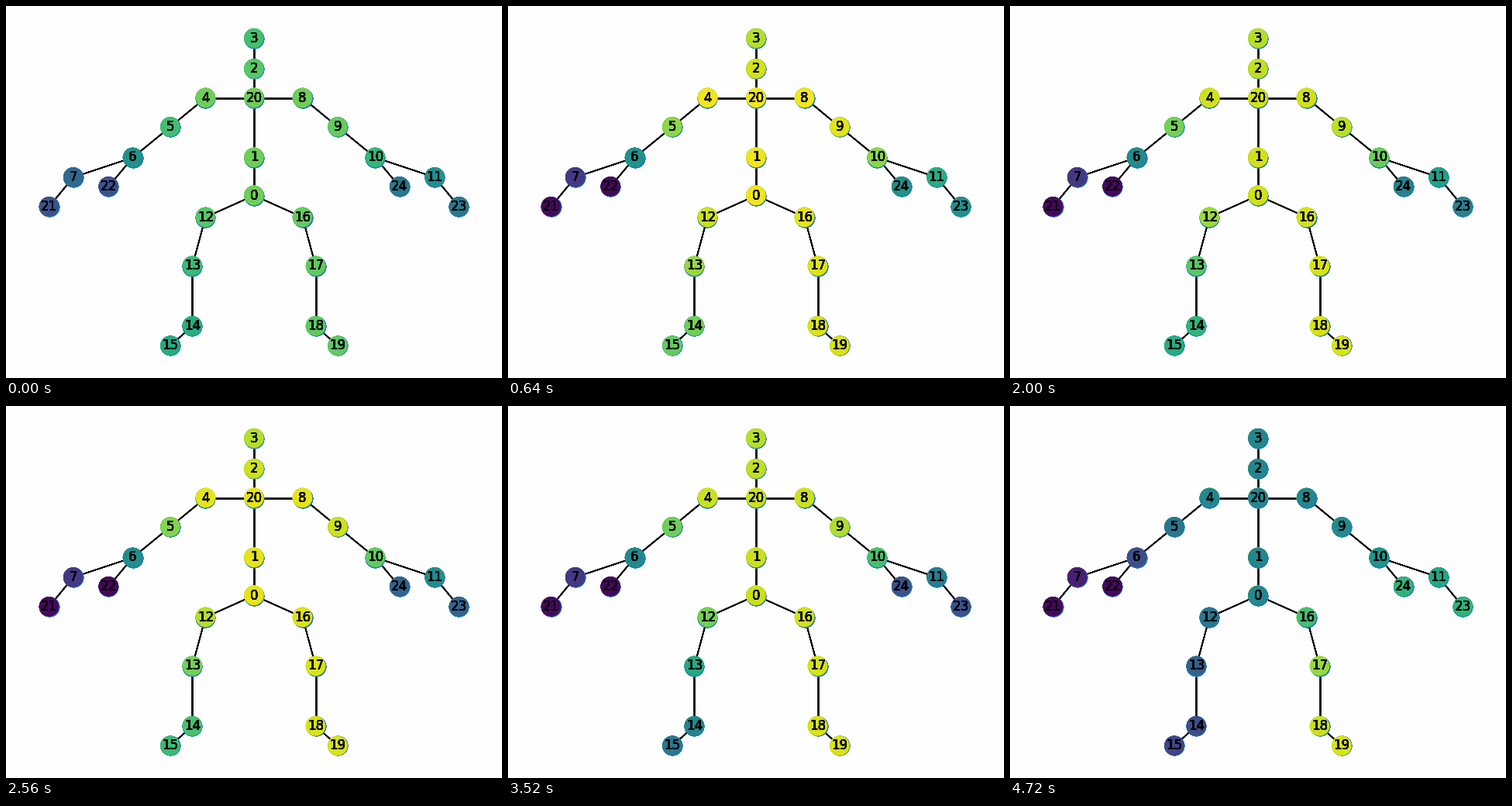
These frames come from a looping animation (640x480 px, 4.8 s). A matplotlib script:

```python
import numpy as np
import matplotlib.pyplot as plt
from matplotlib.animation import FuncAnimation
from matplotlib.collections import LineCollection

W, H, DPI = 640, 480, 100
FRAMES, STEP_MS = 60, 80
COATS = 10  # the graph is painted over itself, which hardens its edges

# Key joints in pixels: the spine, then pairs mirrored about the centre line.
SPINE = {0: 244.5, 1: 195.5, 20: 118.5, 2: 81, 3: 41.65}
PAIRS = [
    (4, 8, 62.56, 118.5), (5, 9, 108.06, 156), (6, 10, 156.4, 195.5),
    (7, 11, 233.2, 221), (21, 23, 264.46, 259), (22, 24, 187.7, 233),
    (12, 16, 62.56, 272.5), (13, 17, 79.6, 335.5), (14, 18, 79.6, 413),
    (15, 19, 108.06, 438.35),
]
TRUNK = [3, 2, 20, 1, 0]
LEFT_ARM, RIGHT_ARM = [4, 5, 6, 7, 21], [8, 9, 10, 11, 23]
LEFT_LEG, RIGHT_LEG = [0, 12, 13, 14, 15], [0, 16, 17, 18, 19]
CHAINS = [TRUNK, [20] + LEFT_ARM, [20] + RIGHT_ARM, LEFT_LEG, RIGHT_LEG,
          [6, 22], [10, 24]]

# Key levels of the parts that vary most.
KEY_MS = [0, 640, 1280, 2560, 3520, 4240, 4720]
CORE = [0.78, 0.98, 0.89, 0.96, 0.92, 0.93, 0.46]
RIGHT_HAND = [0.40, 0.50, 0.60, 0.32, 0.25, 0.23, 0.65]
LEFT_FOOT = [0.61, 0.76, 0.54, 0.68, 0.40, 0.64, 0.20]


def joint_positions():
    pos = np.zeros((25, 2))
    for joint, y in SPINE.items():
        pos[joint] = W / 2, H - y
    for left, right, dx, y in PAIRS:
        pos[left] = W / 2 - dx, H - y
        pos[right] = W / 2 + dx, H - y
    return pos


def smoothstep(u):
    return u * u * (3 - 2 * u)


def activity(frame):
    """Return the level of each joint, blended from the core to the tips."""
    t = frame * STEP_MS
    core, right_hand, left_foot = (
        np.interp(t, KEY_MS, keys) for keys in (CORE, RIGHT_HAND, LEFT_FOOT))
    opening = max(0, 1 - t / KEY_MS[1])
    left_hand = 0.02 + 0.23 * opening
    right_foot = 0.94 - 0.19 * opening
    head = min(core, 0.89) - 0.08 * opening

    levels = np.full(25, core)
    # A bend above 1 keeps the change near the tip of the chain.
    for chain, tip, bend in [
        ([20, 2, 3], head, 1), (LEFT_ARM, left_hand, 1),
        (RIGHT_ARM, right_hand, 1.4), (LEFT_LEG, left_foot, 0.8),
        (RIGHT_LEG, right_foot, 0.5),
    ]:
        u = np.linspace(0, 1, len(chain)) ** bend
        levels[chain] = core + (tip - core) * smoothstep(u)
    levels[22], levels[24] = left_hand, right_hand
    return levels


pos = joint_positions()
x, y = pos.T
levels = [activity(frame) for frame in range(FRAMES)]
bones = [(pos[a], pos[b]) for c in CHAINS for a, b in zip(c, c[1:])]

fig = plt.figure(figsize=(W / DPI, H / DPI), dpi=DPI, facecolor="#fefefe")
ax = fig.add_axes([0, 0, 1, 1])
ax.set_xlim(0, W)
ax.set_ylim(0, H)
ax.axis("off")

coats = []
for _ in range(COATS):
    ax.add_collection(
        LineCollection(bones, colors="black", linewidths=1, zorder=1))
    ax.scatter(x, y, s=300, c="#1f78b4", linewidths=1, zorder=2)
    coats.append(ax.scatter(x, y, s=300, c=levels[0], cmap="viridis",
                            vmin=0, vmax=1, linewidths=1, zorder=2))
    for joint, (jx, jy) in enumerate(pos):
        ax.text(jx, jy, str(joint), ha="center", va="center", fontsize=12,
                family="DejaVu Sans", color="black", zorder=3)


def update(frame):
    # Older coats keep the colours of the moments before.
    for age, coat in enumerate(reversed(coats)):
        coat.set_array(levels[max(frame - age, 0)])
    return coats


anim = FuncAnimation(fig, update, frames=FRAMES, interval=STEP_MS,
                     repeat=True, repeat_delay=0, blit=False)
plt.show()
```
